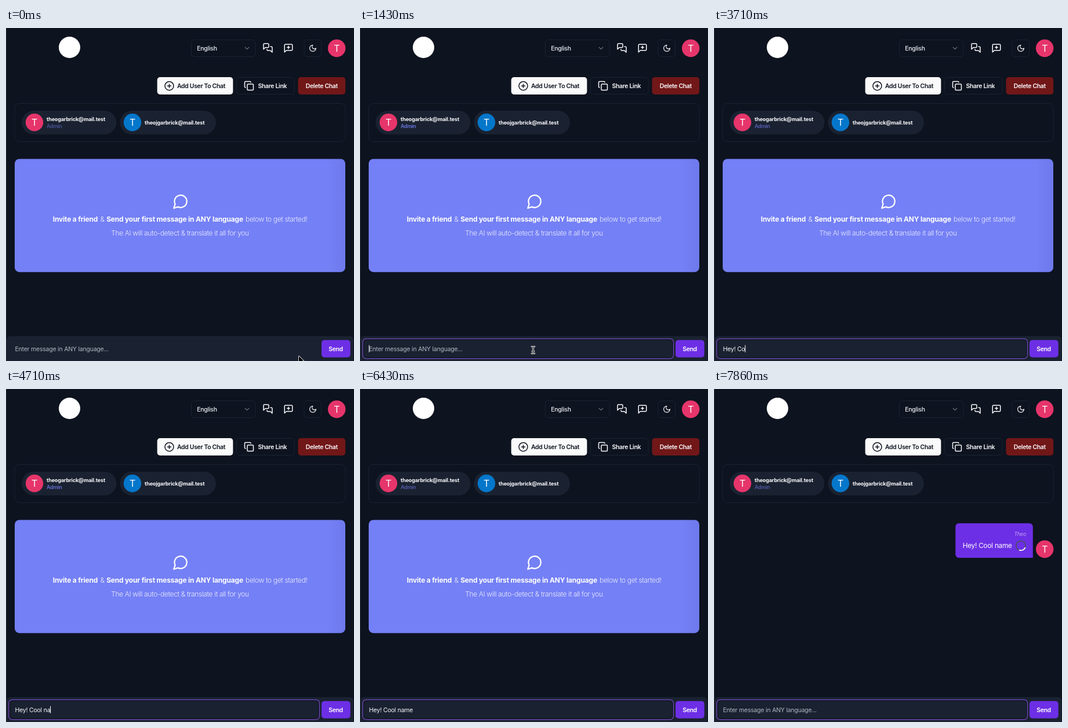
These frames come from a looping animation (600x576 px, 8000 ms). An HTML page with a canvas:

```html
<!DOCTYPE html>
<html lang="en">
<head>
<meta charset="utf-8">
<title>Chat</title>
<style>
  html, body { margin: 0; width: 100%; height: 100%; overflow: hidden; background: #0d131f; }
  canvas { display: block; width: 600px; height: 576px; }
</style>
</head>
<body>
<canvas id="stage"></canvas>
<script>
const W = 600, H = 576, LOOP = 8000, STEP = 1000 / 7;
const canvas = document.getElementById('stage');
const ctx = canvas.getContext('2d');
const dpr = window.devicePixelRatio || 1;
canvas.width = W * dpr;
canvas.height = H * dpr;

const BG = '#0d131f', PANEL = '#1a2231', LINE = '#1b2332', WHITE = '#fafafc';
const PINK = '#e6356b', BLUE = '#0577cb', INDIGO = '#7480f5', VIOLET = '#6d2fe5';
const MESSAGE = 'Hey! Cool name';
const TRACK = { 300: -0.03, 400: -0.021, 500: -0.026, 600: -0.034, 700: -0.016 };

// Key moments, in steps
const FOCUS = 7, TYPE = 17, SEND = 46;

const ICONS = {
  chats: ['M14 9a2 2 0 0 1-2 2H6l-4 4V4a2 2 0 0 1 2-2h8a2 2 0 0 1 2 2v5Z',
          'M18 9h2a2 2 0 0 1 2 2v11l-4-4h-6a2 2 0 0 1-2-2v-1'],
  newChat: ['M21 15a2 2 0 0 1-2 2H7l-4 4V5a2 2 0 0 1 2-2h14a2 2 0 0 1 2 2z', 'M12 7v6M9 10h6'],
  moon: ['M12 3a6 6 0 0 0 9 9 9 9 0 1 1-9-9Z'],
  plus: ['M22 12a10 10 0 1 1-20 0a10 10 0 1 1 20 0Z', 'M8 12h8M12 8v8'],
  copy: ['M10 8h10a2 2 0 0 1 2 2v10a2 2 0 0 1-2 2H10a2 2 0 0 1-2-2V10a2 2 0 0 1 2-2Z',
         'M4 16c-1.1 0-2-.9-2-2V4c0-1.1.9-2 2-2h10c1.1 0 2 .9 2 2'],
  bubble: ['m3 21 1.9-5.7a8.5 8.5 0 1 1 3.8 3.8z'],
  down: ['m6 9 6 6 6-6']
};
for (const name in ICONS) ICONS[name] = ICONS[name].map(d => new Path2D(d));

function icon(name, x, y, scale, color = WHITE, width = 2) {
  ctx.save();
  ctx.translate(x - 12 * scale, y - 12 * scale);
  ctx.scale(scale, scale);
  ctx.strokeStyle = color;
  ctx.lineWidth = width;
  ctx.lineCap = ctx.lineJoin = 'round';
  ICONS[name].forEach(p => ctx.stroke(p));
  ctx.restore();
}

function box(x, y, w, h, r, fill, stroke, width = 1) {
  ctx.beginPath();
  ctx.roundRect(x, y, w, h, r);
  if (fill) { ctx.fillStyle = fill; ctx.fill(); }
  if (stroke) { ctx.strokeStyle = stroke; ctx.lineWidth = width; ctx.stroke(); }
}

function disc(x, y, r, fill) {
  ctx.beginPath();
  ctx.arc(x, y, r, 0, Math.PI * 2);
  ctx.fillStyle = fill;
  ctx.fill();
}

function setFont(size, weight, style = '') {
  ctx.font = `${style} ${weight} ${size}px Inter, "Open Sans", sans-serif`;
  ctx.letterSpacing = TRACK[weight] * size + 'px';
}

function text(str, x, y, size, weight, color, align = 'left', style) {
  setFont(size, weight, style);
  ctx.textAlign = align;
  ctx.fillStyle = color;
  ctx.fillText(str, x, y);
}

function avatar(x, y, color) {
  disc(x, y, 15.2, color);
  text('T', x, y + 5.8, 16, 400, '#fff', 'center');
}

function header() {
  disc(109.5, 33.5, 18.5, '#fff');
  box(319.5, 20.5, 110.5, 29, 5, null, LINE);
  text('English', 346.5, 38.7, 10.5, 500, '#eef0f5', 'center');
  icon('down', 415.5, 35, 0.56, '#7d828d', 1.8);
  icon('chats', 451.5, 34.5, 0.75);
  icon('newChat', 487, 35, 0.75);
  box(514, 20.5, 29.5, 29, 5, null, LINE);
  icon('moon', 529, 35, 0.6);
  avatar(570.2, 35, PINK);
}

function actions() {
  box(260.7, 85, 130.7, 30, 5, '#fafafa');
  icon('plus', 281.5, 100.2, 0.75, BG);
  text('Add User To Chat', 336.5, 104, 10.5, 600, BG, 'center');
  box(397.5, 85.5, 99.5, 29, 5, null, LINE);
  icon('copy', 419, 100, 0.75);
  text('Share Link', 459.3, 104, 10.5, 600, WHITE, 'center');
  box(503.5, 85, 81.7, 30, 5, '#711718');
  text('Delete Chat', 544.3, 104, 10.5, 600, WHITE, 'center');
}

// Opacity swings between 1 and .5 every two seconds
function pulse(t) {
  return 0.75 - 0.25 * Math.cos((t - 120) / 1000 * Math.PI);
}

function members(t) {
  box(15, 130.5, 570, 66, 8, null, LINE);
  box(27, 143, 163.5, 41, 20.5, PANEL);
  avatar(49, 163.3, PINK);
  text('theogarbrick@mail.test', 70, 160.6, 9, 700, WHITE);
  ctx.globalAlpha = pulse(t);
  text('Admin', 70, 172.7, 9, 600, INDIGO);
  ctx.globalAlpha = 1;
  box(196.5, 143, 165.5, 41, 20.5, PANEL);
  avatar(218, 163.3, BLUE);
  text('theojgarbrick@mail.test', 239, 166.6, 9, 700, WHITE);
}

function welcome() {
  const fill = ctx.createLinearGradient(555, 0, 585, 0);
  fill.addColorStop(0, INDIGO);
  fill.addColorStop(1, '#6e79ec');
  box(15, 226.5, 570, 195.7, 8, fill);
  icon('bubble', 300.5, 300.5, 1.25, '#fff', 1.8);
  const soft = '#eceefe', y = 334.6;
  text('Invite a friend', 119.5, y, 12, 700, '#fff', 'center');
  text('&', 166, y, 12, 300, soft, 'center');
  text('Send your first message in ANY language', 291, y, 12, 700, '#fff', 'center');
  text('below to get started!', 466.3, y, 12, 300, soft, 'center');
  text('The AI will auto-detect & translate it all for you', 300, 358.7, 12, 300, soft, 'center');
}

function sentMessage(t) {
  box(416.3, 232.3, 133.5, 59.7, [6, 6, 0, 6], VIOLET);
  text('Theo', 538, 253.6, 9, 300, '#d6c8fa', 'right', 'italic');
  text(MESSAGE, 471.2, 275.4, 11.8, 400, '#fff', 'center');
  avatar(570.2, 277, PINK);

  const turn = (t - SEND * STEP) / 1000 * Math.PI * 2;
  ctx.lineWidth = 1.8;
  ctx.lineCap = 'round';
  ctx.strokeStyle = '#4b5060';
  ctx.beginPath();
  ctx.arc(529, 271, 8.2, 0, Math.PI * 2);
  ctx.stroke();
  ctx.strokeStyle = '#fff';
  ctx.beginPath();
  ctx.arc(529, 271, 8.2, turn - 1.35, turn + 0.05);
  ctx.stroke();
}

function typedCount(k) {
  if (k < TYPE || k >= SEND) return 0;
  if (k === TYPE) return 1;
  return k <= 33 ? Math.floor(2 + (k - 18) * 2 / 3) : Math.min(MESSAGE.length, k - 21);
}

function caretShown(k, t) {
  if (k < FOCUS) return false;
  if (k < TYPE) return (t - FOCUS * STEP) % 1000 < 500;
  return t < 4900 || (t - 4900) % 1000 < 500;
}

function composer(k, t) {
  box(1, 533, 598, 44, [6, 6, 0, 0], PANEL);
  if (k >= FOCUS) {
    box(4.7, 537.5, 535.8, 34.3, 6, BG, '#6a48ac', 1.5);
    box(7, 540, 531.3, 29.6, 4, PANEL);
  }
  const typed = MESSAGE.slice(0, typedCount(k));
  if (typed) text(typed, 15.5, 558.6, 10.5, 400, '#f6f8fb');
  else text('Enter message in ANY language...', 15.5, 558.6, 10.5, 400, '#b0b6c2');
  if (caretShown(k, t)) {
    setFont(10.5, 400);
    ctx.fillStyle = '#fff';
    ctx.fillRect(15.3 + ctx.measureText(typed).width, 548.5, 1, 12.5);
  }
  box(544, 539.7, 49.7, 30, 5, VIOLET);
  text('Send', 568.5, 558.5, 10.5, 600, '#fff', 'center');
}

const ARROW = new Path2D('M0 0V11.5L2.7 9L4.6 13.2L6.4 12.4L4.6 8.3H8.2Z');
const BEAM = new Path2D('M-2.5-6Q0-6 0-4.5Q0-6 2.5-6M0-4.5V4.5M-2.5 6Q0 6 0 4.5Q0 6 2.5 6M-1.5 2H1.5');

function pointer(k, t) {
  if (k >= TYPE - 1) return;
  const p = Math.min(1, Math.max(0, t - 100) / 850);
  const e = p * p * (3 - 2 * p);
  ctx.save();
  ctx.translate(505 - 206.5 * e, 567.5 - 10.5 * e);
  ctx.lineJoin = ctx.lineCap = 'round';
  ctx.strokeStyle = '#fff';
  if (p < 0.15) {
    ctx.lineWidth = 1.6;
    ctx.stroke(ARROW);
    ctx.fillStyle = '#000';
    ctx.fill(ARROW);
  } else {
    ctx.lineWidth = 2.6;
    ctx.stroke(BEAM);
    ctx.strokeStyle = '#111';
    ctx.lineWidth = 1;
    ctx.stroke(BEAM);
  }
  ctx.restore();
}

function draw(now) {
  const k = Math.floor((now % LOOP + 5) / STEP) % 56;
  const t = k * STEP;
  ctx.setTransform(dpr, 0, 0, dpr, 0, 0);
  ctx.fillStyle = BG;
  ctx.fillRect(0, 0, W, H);
  header();
  actions();
  members(t);
  if (k < SEND) welcome();
  else sentMessage(t);
  composer(k, t);
  ctx.fillStyle = '#252b36';
  ctx.fillRect(0, 0, 1, H);
  pointer(k, t);
}

let start;
function tick(now) {
  if (start === undefined) start = now;
  draw(Math.max(0, now - start));
  requestAnimationFrame(tick);
}
requestAnimationFrame(tick);
</script>
</body>
</html>
```
